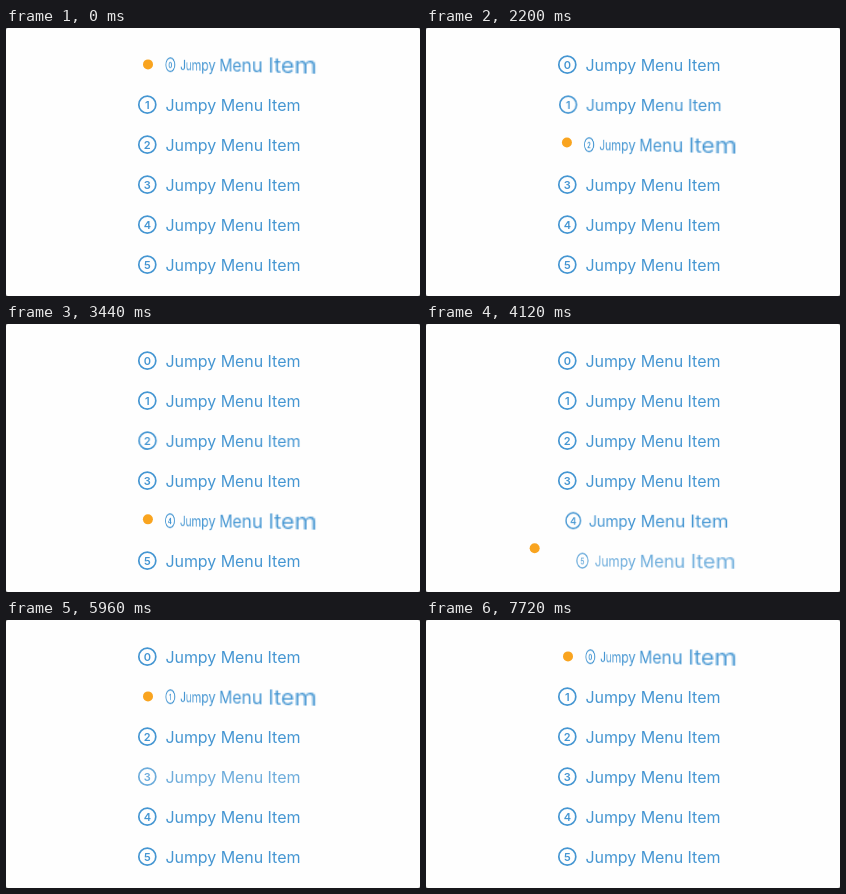
An HTML page for the animation above (7760 ms loop, 414 by 268 pixels).

```html
<!DOCTYPE html>
<html lang="en">
<head>
<meta charset="utf-8">
<title>Jumpy menu</title>
<style>
  html, body { margin: 0; width: 100%; height: 100%; overflow: hidden; background: #808080; }
  #stage { position: relative; width: 414px; height: 268px; overflow: hidden; background: #fefefe; border-radius: 2px; }
  #stage svg { position: absolute; left: 0; width: 414px; height: 40px; overflow: visible; }
  text { font-family: Inter, "Open Sans", sans-serif; fill: #4596d2; }
  .label { font-size: 16px; letter-spacing: -0.05px; }
  .digit { font-size: 11px; font-weight: 600; text-anchor: middle; }
  .ring { fill: none; stroke: #4596d2; stroke-width: 1.7; }
  #dot { position: absolute; left: -5.2px; top: -5.2px; width: 10.4px; height: 10.4px; border-radius: 50%; background: #f9a41f; }
</style>
</head>
<body>
<div id="stage"></div>
<script>
const LOOP = 7760;
const ROWS = 6;
const PITCH = 40;
const TILT = 36;        // degrees, selected row
const SWING = 50;       // how far the dot swings left
const STIFF = 0.02;     // spring rate per ms
const DIM = 0.42;       // opacity lost while pressed
const FADE_IN = 80;
const FADE_OUT = 240;

const jumps = [
  { to: 1, press: 990, release: 1163 },
  { to: 2, press: 1810, release: 1960 },
  { to: 4, press: 3030, release: 3125 },
  { to: 5, press: 3850, release: 4000 },
  { to: 1, press: 4820, release: 4930 },
  { to: 3, press: 5920, release: 6050 },
  { to: 0, press: 6740, release: 6872 }
];

const stage = document.getElementById('stage');
const rows = Array.from({ length: ROWS }, (_, i) => {
  stage.insertAdjacentHTML('beforeend',
    `<svg style="top:${17 + PITCH * i}px" viewBox="0 0 414 40">
      <circle class="ring" cx="141.3" cy="19.7" r="8.5"/>
      <text class="digit" x="141.3" y="23.7">${i}</text>
      <text class="label" x="159.4" y="25.7">Jumpy Menu Item</text>
    </svg>`);
  return stage.lastElementChild;
});
stage.insertAdjacentHTML('beforeend', '<div id="dot"></div>');
const dot = stage.lastElementChild;

const clamp = v => Math.min(1, Math.max(0, v));

// Critically damped spring from 0 to 1.
function spring(ms) {
  const x = STIFF * Math.max(0, ms);
  return 1 - (1 + x) * Math.exp(-x);
}

function pressed(jump, t) {
  return clamp((t - jump.press) / FADE_IN) * (1 - clamp((t - jump.release) / FADE_OUT));
}

function draw(t) {
  let from = 0, to = 0, p = 1;
  const dim = new Array(ROWS).fill(0);
  for (const jump of jumps) {
    dim[jump.to] = Math.max(dim[jump.to], pressed(jump, t));
    if (t >= jump.release) {
      from = to;
      to = jump.to;
      p = spring(t - jump.release);
    }
  }

  rows.forEach((row, i) => {
    const amount = i === to ? p : i === from ? 1 - p : 0;
    row.style.transform = amount > 0.001
      ? `perspective(159px) rotateY(${-TILT * amount}deg)` : 'none';
    row.style.opacity = 1 - DIM * dim[i];
  });

  const x = 142 - SWING * Math.sin(Math.PI * p) ** 2;
  const y = 36.4 + PITCH * (from + (to - from) * p);
  dot.style.transform = `translate(${x}px, ${y}px)`;
}

const start = performance.now();
function tick() {
  draw((performance.now() - start) % LOOP);
  requestAnimationFrame(tick);
}
tick();
</script>
</body>
</html>
```
